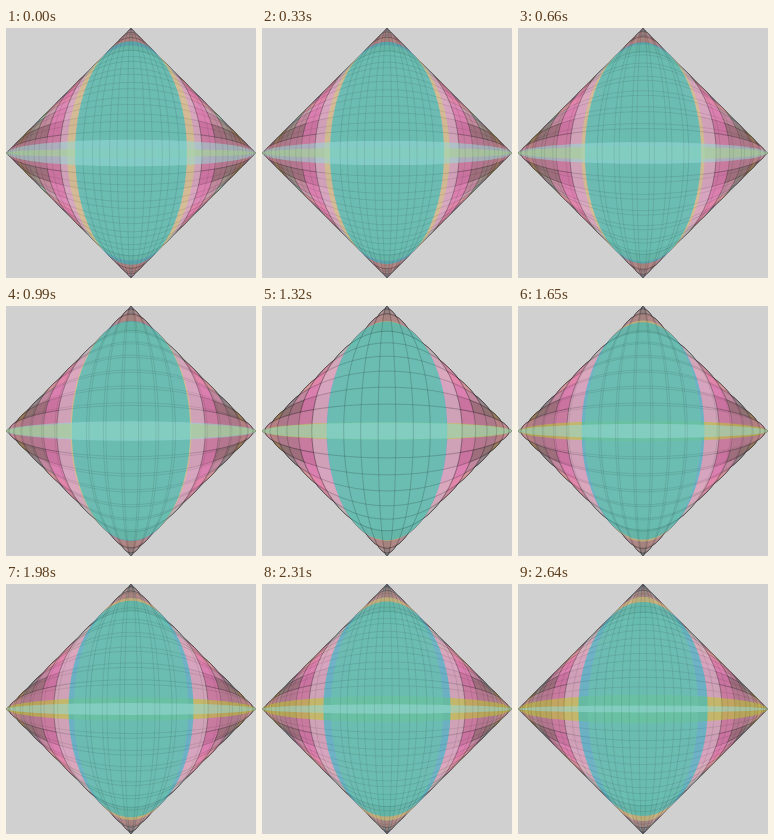
Recreate the animation shown at these times as an HTML page with a canvas. Size 250 by 250 pixels, loop 2.97 s.

```html
<!DOCTYPE html>
<html lang="en">
<head>
<meta charset="utf-8">
<title>Ellipses in a diamond</title>
<style>
  html, body { margin: 0; width: 100%; height: 100%; overflow: hidden; background: #d0d0d0; }
  canvas { display: block; width: 100vw; height: 100vh; }
</style>
</head>
<body>
<canvas id="stage" width="250" height="250"></canvas>
<script>
const ctx = document.getElementById('stage').getContext('2d');
const R = 125;
const STEP_MS = 330;
const STEPS = 9;
const LAYERS = 44;
const PERIOD = 22;             // 22 radians are almost 7 pi
const GAP = Math.PI / PERIOD;  // angle between neighbouring ellipses
const PLAIN = 4;               // newest ellipses have no outline

// Newest ellipse first
const COLORS = [
  '151,217,216', '26,190,206', '209,206,117', '188,201,49', '214,196,204',
  '180,134,124', '198,128,158', '238,120,190', '150,108,104', '132,88,100',
  '222,130,174', '172,124,122', '150,100,112'
];

// Every ellipse with these half axes touches all four sides of the diamond.
function trace(angle) {
  ctx.beginPath();
  ctx.ellipse(R, R, R * Math.abs(Math.cos(angle)), R * Math.abs(Math.sin(angle)), 0, 0, 2 * Math.PI);
}

function outline(alpha) {
  ctx.strokeStyle = `rgba(25,25,30,${alpha})`;
  ctx.stroke();
}

function draw(step) {
  const newest = -GAP * (0.75 - 0.07 * step);
  ctx.fillStyle = '#d0d0d0';
  ctx.fillRect(0, 0, 2 * R, 2 * R);
  ctx.lineWidth = 0.8;
  for (let k = LAYERS - 1; k >= 0; k--) {
    trace(newest - k);
    ctx.fillStyle = `rgba(${COLORS[k % COLORS.length]},0.55)`;
    ctx.fill();
    if (k >= PLAIN) outline(0.32);
  }
  // Keep the covered lines faintly visible
  for (let k = PLAIN; k < PERIOD; k++) {
    trace(newest - k);
    outline(0.12);
  }
}

let shown = -1;
const start = performance.now();
function tick() {
  const step = Math.floor((performance.now() - start) / STEP_MS) % STEPS;
  if (step !== shown) draw(shown = step);
  requestAnimationFrame(tick);
}
tick();
</script>
</body>
</html>
```
